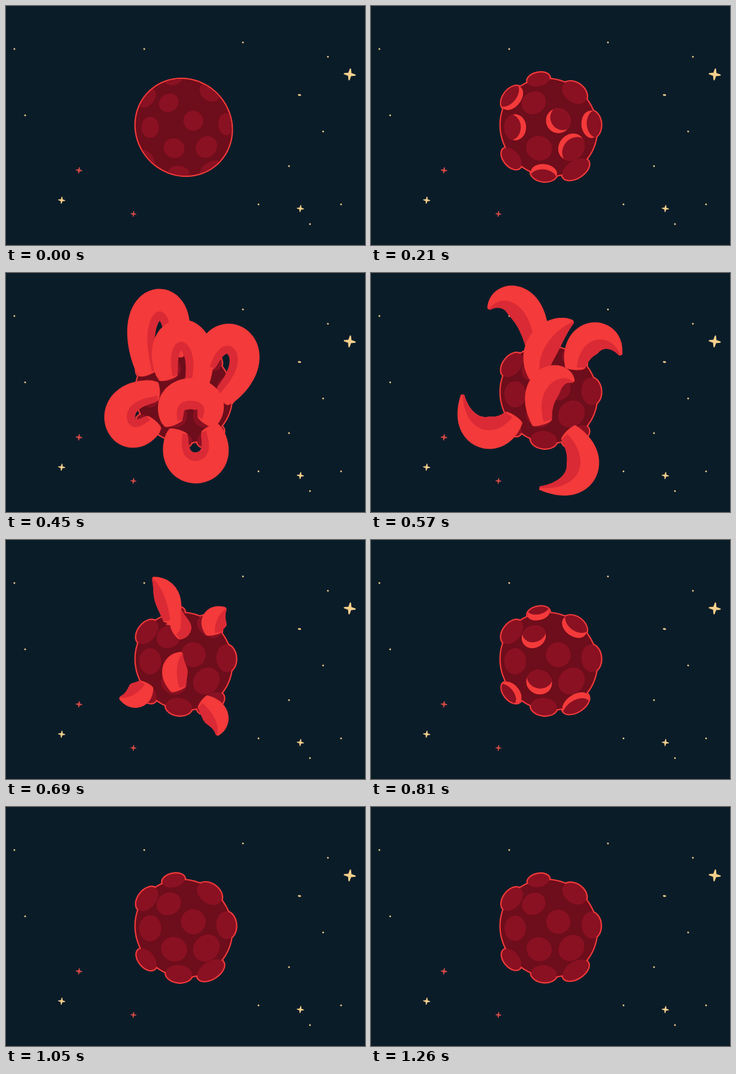
Recreate the animation shown at these times as an HTML page with a canvas. Size 600 by 400 pixels, loop 1.29 s.

```html
<!DOCTYPE html>
<html lang="en">
<head>
<meta charset="utf-8">
<title>Worm planet</title>
<style>
html, body { margin: 0; width: 100%; height: 100%; overflow: hidden; background: #0b1c29; }
canvas { display: block; }
</style>
</head>
<body>
<canvas id="stage" width="600" height="400"></canvas>
<script>
const ctx = document.getElementById('stage').getContext('2d');
const LOOP = 1290, STEP = 30;
const RED = '#f43a3a', SHADE = '#da2a35', DARK = '#6e0d1b', PORE = '#8a1122';
const CREAM = '#f5d08c', CORAL = '#d64a45';
const CENTER = [297, 203];

const clamp = x => Math.max(0, Math.min(1, x));
const mix = (a, b, k) => a + (b - a) * k;
const mixPt = (p, q, k) => [mix(p[0], q[0], k), mix(p[1], q[1], k)];
const add = (p, v, k = 1) => [p[0] + v[0] * k, p[1] + v[1] * k];
const sub = (p, q) => add(p, q, -1);
const dot = (p, q) => p[0] * q[0] + p[1] * q[1];
const unit = v => add([0, 0], v, 1 / (Math.hypot(...v) || 1));
const perp = v => [-v[1], v[0]];
const angle = v => Math.atan2(v[1], v[0]);
const polar = (p, a, r) => add(p, [Math.cos(a), Math.sin(a)], r);
const bezier = (p, u) => p.length === 1 ? p[0]
  : bezier(p.slice(1).map((q, i) => mixPt(p[i], q, u)), u);

function polygon(pts) {
  const path = new Path2D();
  pts.forEach(p => path.lineTo(...p));
  path.closePath();
  return path;
}

function ellipse(p, rx, ry, turn) {
  const path = new Path2D();
  path.ellipse(...p, rx, ry, turn, 0, 2 * Math.PI);
  return path;
}

function fill(path, color) {
  ctx.fillStyle = color;
  ctx.fill(path);
}

// A circle slightly stretched along one diagonal
const ball = polygon(Array.from({ length: 120 }, (_, i) => {
  const a = i * Math.PI / 60;
  return polar(CENTER, a, 80.5 + 2 * Math.cos(2 * a - 8));
}));

const pores = {
  top: [280, 123, 19], topLeft: [236, 154, 23], topRight: [340, 145, 23],
  upper: [272, 162, 21], left: [241, 203, 22], middle: [313, 192, 21], right: [368, 198, 23],
  lower: [281, 238, 22], lowerRight: [335, 236, 24],
  bottomLeft: [235, 255, 21], bottom: [289, 279, 22], bottomRight: [342, 273, 25]
};

// Crest of the arch from tail to head pore, then free tip and bend once the tail has let go
const worms = [
  { tail: 'topLeft', head: 'top', crest: [252, 53], tip: [197, 60], bend: [243, 48] },
  { tail: 'middle', head: 'upper', crest: [298, 104], tip: [338, 82], bend: [295, 110] },
  { tail: 'right', head: 'topRight', crest: [388, 117], tip: [417, 137], bend: [375, 108] },
  { tail: 'lowerRight', head: 'lower', crest: [311, 202], tip: [338, 182], bend: [298, 182] },
  { tail: 'left', head: 'bottomLeft', crest: [191, 248], tip: [153, 204], bend: [184, 265] },
  { tail: 'bottom', head: 'bottomRight', crest: [320, 326], tip: [282, 360], bend: [350, 335] }
];

const dots = [[14, 72], [32, 183], [231, 72], [396, 61], [538, 85], [530, 210], [473, 268], [422, 332], [508, 365], [560, 332]];
const sparkles = [[574.5, 114.5, 10, CREAM], [93, 325, 6, CREAM], [492, 339, 6, CREAM], [122, 275, 5.5, CORAL], [213, 348, 5, CORAL]];

function drawSky() {
  ctx.fillStyle = '#0b1c29';
  ctx.fillRect(0, 0, 600, 400);
  dots.forEach(p => fill(ellipse(p, 1.5, 1.3, 0.5), CREAM));
  fill(ellipse([490.5, 149], 2.8, 1.4, 0.1), CREAM);
  ctx.lineJoin = 'round';
  for (const [x, y, r, color] of sparkles) {
    const star = polygon(Array.from({ length: 8 }, (_, i) =>
      polar([x, y], i * Math.PI / 4 + 0.12, i % 2 ? r * 0.24 : r * 0.9)));
    ctx.lineWidth = r * 0.22;
    ctx.strokeStyle = color;
    ctx.stroke(star);
    fill(star, color);
  }
}

// Pores look flatter towards the edge of the ball
function poreShape([x, y, r], size = 1, shift = [0, 0]) {
  const out = sub([x, y], CENTER);
  const squash = Math.sqrt(1 - dot(out, out) / 102 ** 2);
  return ellipse(add([x, y], shift), r * size * squash, r * size, angle(out));
}

function drawPlanet(swell) {
  const holes = new Path2D();
  Object.values(pores).forEach(p => holes.addPath(poreShape(p, 0.8 + 0.2 * swell)));
  const flat = swell < 0.2;
  ctx.lineWidth = 4.4;
  ctx.strokeStyle = RED;
  ctx.stroke(ball);
  if (!flat) ctx.stroke(holes);
  fill(ball, DARK);
  ctx.save();
  if (flat) ctx.clip(ball);
  fill(holes, PORE);
  ctx.restore();
}

// Glowing crescent on the side of the pore that faces dir
function drawLip(pore, dir, gap) {
  if (gap <= 0) return;
  const shape = poreShape(pore);
  ctx.save();
  ctx.clip(shape);
  fill(shape, RED);
  fill(poreShape(pore, 1, add([0, 0], unit(dir), -gap)), PORE);
  ctx.restore();
}

// Cubic whose midpoint is the crest and whose ends reach a little into the pores
function spineOf(worm, fling) {
  const head = pores[worm.head].slice(0, 2);
  const tail = mixPt(pores[worm.tail].slice(0, 2), worm.tip, fling);
  const crest = mixPt(worm.crest, worm.bend, fling);
  const base = mixPt(tail, head, 0.5), rise = sub(crest, base), up = unit(rise);
  const side = perp(up), spread = mix(60, 30, clamp(fling)) * Math.sign(dot(side, sub(tail, head)));
  const top = add(base, rise, 4 / 3), sunk = 13;
  // Sinking both ends is balanced by lifting both handles
  const lifted = add(top, up, sunk * mix(1, 0.5, clamp(fling)) / 3);
  return {
    up,
    points: [add(tail, up, -sunk * (1 - clamp(fling))), add(lifted, side, spread),
      add(lifted, side, -spread), add(head, up, -sunk)]
  };
}

function drawWorm(worm, t) {
  const grow = Math.sin(clamp((t - 210) / 220) * Math.PI / 2);
  const sink = clamp((t - 600) / 190);
  if (grow === 0 || sink > 0.95) return;
  const fling = Math.max(0, Math.min(1.35, (t - 470) / 100)), free = clamp(fling);
  const { points, up } = spineOf(worm, fling);
  const root = points[sink ? 3 : 0];
  const scale = sink ? 1 - sink * 0.45 : 0.4 + 0.6 * grow;
  const at = k => mixPt(root, bezier(points, mix(sink, grow, k)), scale);
  const heading = k => unit(sub(at(k + 0.01), at(k - 0.01)));
  const inward = -Math.sign(dot(perp(heading(0.5)), up)) || 1;
  const radius = k => scale * mix(16 + 10 * Math.sqrt(Math.sin(Math.PI * k) + 1e-9),
    3 + 24 * Math.sin(0.8 * Math.PI * k), free);
  const edge = offset => Array.from({ length: 41 }, (_, i) =>
    add(at(i / 40), perp(heading(i / 40)), inward * radius(i / 40) * offset));

  const inner = edge(1).reverse();
  for (const k of [0, 1]) {
    const r = radius(k), bulge = k && grow < 1 ? 0.9 : 0.25;
    fill(ellipse(at(k), r * bulge, r, angle(heading(k))), RED);
  }
  fill(polygon([...edge(-1), ...inner]), RED);
  fill(polygon([...edge(mix(0.45, 0.16, free)), ...inner]), SHADE);
}

function draw(t) {
  drawSky();
  drawPlanet(t < 600 ? clamp(t / 120) : 1 - 0.15 * clamp((t - 1080) / 180));
  const opening = t < 330 ? clamp((t - 120) / 90) : 0;
  const closing = t > 720 ? clamp((900 - t) / 90) : 0;
  for (const worm of worms) {
    const tail = pores[worm.tail], head = pores[worm.head];
    drawLip(tail, sub(CENTER, tail), 9 * opening);
    drawLip(head, sub(mixPt(tail, head, 0.5), worm.crest), 10 * closing);
  }
  worms.forEach(worm => drawWorm(worm, t));
}

function tick() {
  draw(Math.floor(performance.now() % LOOP / STEP) * STEP);
  requestAnimationFrame(tick);
}
tick();
</script>
</body>
</html>
```
